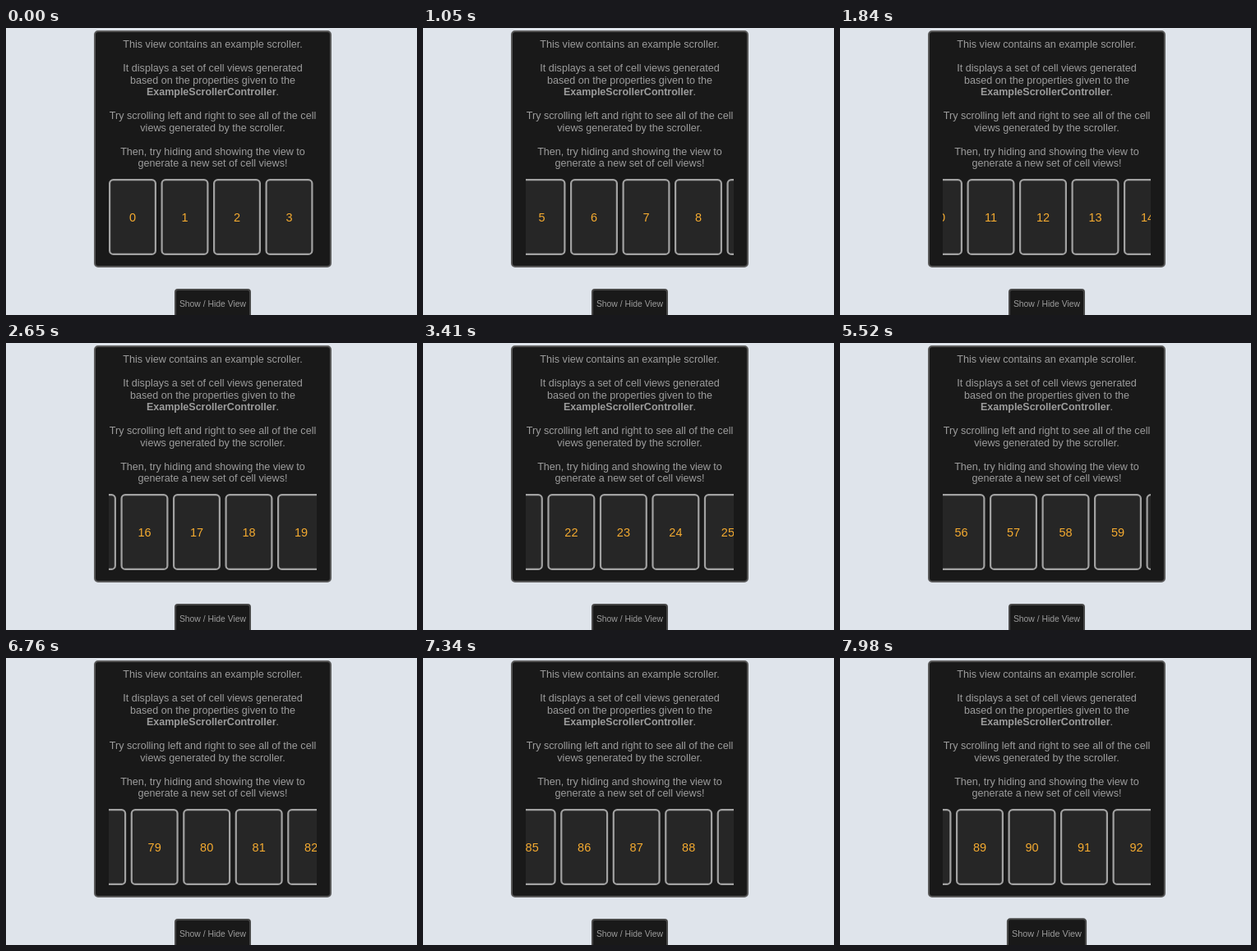
Write an HTML page with a canvas that moves like this. It is 500 px wide and 350 px high and loops after 8000 ms.

```html
<!DOCTYPE html>
<html lang="en">
<head>
<meta charset="utf-8">
<title>Example scroller</title>
<style>
  html, body { margin: 0; width: 100%; height: 100%; overflow: hidden; background: #dfe4eb; }
  canvas { display: block; }
</style>
</head>
<body>
<canvas id="stage" width="500" height="350"></canvas>
<script>
const ctx = document.getElementById('stage').getContext('2d');
const LOOP = 8000;
const MID = 251.5;
const PITCH = 63.5;
const FONT = '"Liberation Sans", Arial, sans-serif';
const LINES = [
  'This view contains an example scroller.',
  '',
  'It displays a set of cell views generated',
  'based on the properties given to the',
  '*ExampleScrollerController',
  '',
  'Try scrolling left and right to see all of the cell',
  'views generated by the scroller.',
  '',
  'Then, try hiding and showing the view to',
  'generate a new set of cell views!'
];

// Moments at which the scroller stalls for 100 ms.
const STALLS = [770, 1840, 3230, 5520, 6580, 7390];
// Scroll offset in pixels at given times.
const STOPS = [
  [20, 0], [1840, 669], [3410, 1370], [4530, 2263],
  [5520, 3562.5], [6760, 4989], [7980, 5635.5]
];

const clamp = (v, lo, hi) => Math.min(hi, Math.max(lo, v));
const running = t => STALLS.reduce((sum, s) => sum - clamp(t - s, 0, 100), t);

const knots = STOPS.map(([t, x]) => [running(t), x]);
const slopes = knots.slice(1).map((k, i) => (k[1] - knots[i][1]) / (k[0] - knots[i][0]));
const tangents = knots.map((_, i) => {
  if (i === 0) return slopes[0] * 0.7;
  if (i === slopes.length) return slopes[i - 1] * 0.25;
  return 2 * slopes[i - 1] * slopes[i] / (slopes[i - 1] + slopes[i]);
});

function scrollAt(time) {
  const t = clamp(running(time), knots[0][0], knots[knots.length - 1][0]);
  let i = 0;
  while (i < slopes.length - 1 && t > knots[i + 1][0]) i++;
  const [t0, x0] = knots[i], [t1, x1] = knots[i + 1];
  const h = t1 - t0, u = (t - t0) / h, v = 1 - u;
  return x0 * (1 + 2 * u) * v * v + x1 * u * u * (3 - 2 * u)
    + h * u * v * (tangents[i] * v - tangents[i + 1] * u);
}

function box(x, y, w, h, radius, line, fill, stroke) {
  ctx.beginPath();
  ctx.roundRect(x + line / 2, y + line / 2, w - line, h - line, radius);
  ctx.fillStyle = fill;
  ctx.fill();
  ctx.lineWidth = line;
  ctx.strokeStyle = stroke;
  ctx.stroke();
}

function label(text, x, y, size, color) {
  ctx.font = `${size}px ${FONT}`;
  ctx.fillStyle = color;
  ctx.textAlign = 'center';
  ctx.fillText(text, x, y);
}

function drawText() {
  LINES.forEach((line, i) => {
    const y = 24.4 + i * 14.47;
    if (line[0] !== '*') return label(line, MID, y, 12.6, '#9c9c9c');
    const name = line.slice(1);
    ctx.fillStyle = '#9c9c9c';
    ctx.textAlign = 'left';
    ctx.font = `bold 12.5px ${FONT}`;
    const width = ctx.measureText(name).width;
    const left = MID - (width + 3.5) / 2;
    ctx.fillText(name, left, y);
    ctx.font = `12.6px ${FONT}`;
    ctx.fillText('.', left + width, y);
  });
}

function drawCells(offset) {
  ctx.save();
  ctx.beginPath();
  ctx.rect(125, 184, 253, 93);
  ctx.clip();
  const first = Math.max(0, Math.floor(offset / PITCH));
  for (let n = first; n < first + 6; n++) {
    const x = 125 + n * PITCH - offset;
    box(x, 184, 58, 93, 4.5, 2.2, '#262626', '#a2a2a2');
    label(n, x + 29, 236, 14.5, '#f5ab30');
  }
  ctx.restore();
}

function drawButton(time) {
  const u = clamp((time - 7880) / 100, 0, 1);
  const scale = 1 + 0.045 * u;
  ctx.save();
  ctx.translate(MID, 336.5);
  ctx.scale(scale, scale);
  box(-46.5, -18.5, 93, 37, 3, 2, '#191919', '#484848');
  label('Show / Hide View', 0, 3.3, 10.4, '#9c9c9c');
  ctx.restore();
}

function draw(time) {
  ctx.fillStyle = '#dfe4eb';
  ctx.fillRect(0, 0, 500, 350);
  box(107, 3, 289, 289, 4, 2, '#191919', '#585858');
  drawText();
  drawCells(scrollAt(time));
  drawButton(time);
}

const start = performance.now();
function tick() {
  draw((performance.now() - start) % LOOP);
  requestAnimationFrame(tick);
}
tick();
</script>
</body>
</html>
```
